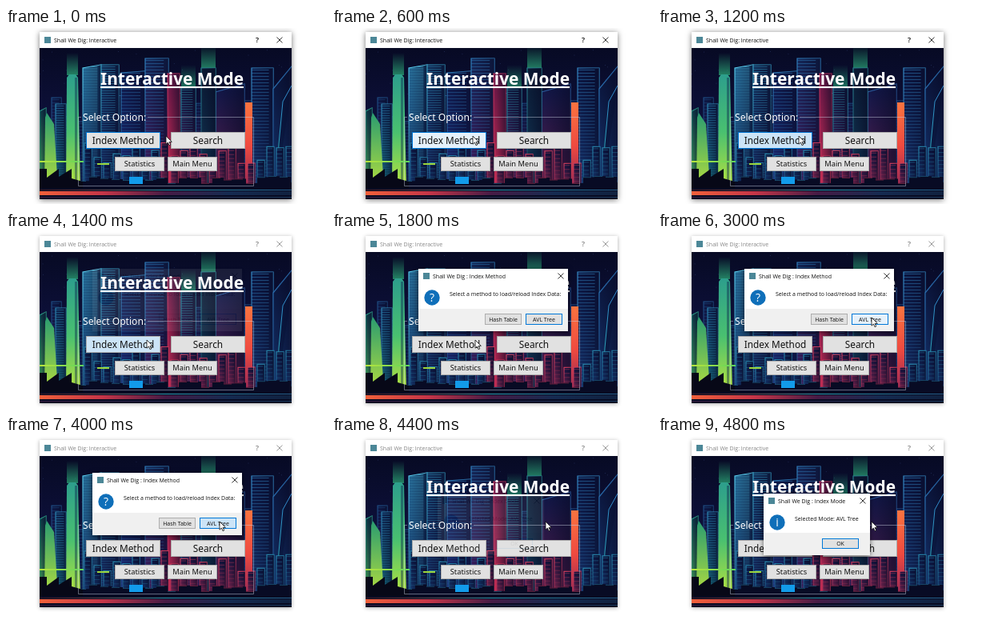
These frames come from a looping animation (400x220 px, 5000 ms). An HTML page with a canvas:

```html
<!DOCTYPE html>
<html lang="en">
<head>
<meta charset="utf-8">
<title>Interactive Mode</title>
<style>
  html, body { margin: 0; width: 400px; height: 220px; overflow: hidden; background: #fff; }
  canvas, svg { position: absolute; left: 0; top: 0; }
  #frame { position: absolute; left: 42px; top: 5px; width: 315px; height: 209px; background: #fff; }
  text { font: 7px "Open Sans", "Noto Sans", sans-serif; fill: #111; }
  .big { font-family: "Noto Sans", "DejaVu Sans", sans-serif; }
  .mid { text-anchor: middle; }
  .dialog { filter: drop-shadow(0 1px 3px #0009); }
</style>
</head>
<body>
<div id="frame"></div>
<canvas id="city" width="400" height="220"></canvas>
<svg id="ui" width="400" height="220" viewBox="0 0 400 220"></svg>
<script>
const LOOP = 5000;
const APP = "Shall We Dig";
const ui = document.getElementById("ui");
const frame = document.getElementById("frame");
const g = document.getElementById("city").getContext("2d");

let seed = 11;
const rnd = () => (seed = seed * 16807 % 2147483647) / 2147483647;
const pick = list => list[Math.floor(rnd() * list.length)];

function box(x, y, w, h, fill) {
  g.fillStyle = fill;
  g.fillRect(x, y, w, h);
}

function blend(grad, colors) {
  colors.forEach((c, i) => grad.addColorStop(i / (colors.length - 1), c));
  return grad;
}
const ramp = (y0, y1, ...colors) => blend(g.createLinearGradient(0, y0, 0, y1), colors);
const sweep = (x0, x1, ...colors) => blend(g.createLinearGradient(x0, 0, x1, 0), colors);

const BASE = 201;

// A tower with roof heights at its left and right, an edge light and floor lines.
function tower(x, w, left, right, c1, c2, edge, floors) {
  const top = Math.min(left, right);
  const light = ramp(top, BASE, edge, edge + "30");
  g.save();
  g.beginPath();
  g.moveTo(x, BASE);
  g.lineTo(x, left);
  g.lineTo(x + w, right);
  g.lineTo(x + w, BASE);
  g.fillStyle = ramp(top, BASE, c1, c2);
  g.fill();
  g.strokeStyle = light;
  g.lineWidth = 1.2;
  g.stroke();
  g.clip();
  // side shade gives the body volume
  box(x, top, w, BASE - top, sweep(x, x + w, "#07092400", "#07092499"));
  if (floors) {
    g.globalAlpha = .55;
    for (let y = top + 2; y < BASE; y += floors) box(x, y, w * .8, .9, light);
  }
  g.restore();
}

function glow(x, w, top, color) {
  box(x, top - 28, w, 28, ramp(top - 28, top, color + "00", color + "b0"));
}

function shape(points, fill) {
  g.beginPath();
  points.forEach(p => g.lineTo(...p));
  g.fillStyle = fill;
  g.fill();
}

function drawCity() {
  g.beginPath();
  g.rect(42, 25, 315, 189);
  g.clip();
  box(42, 25, 315, 189, ramp(25, 200, "#070a24", "#0d103a", "#251650"));
  for (let i = 0; i < 50; i++) box(42 + rnd() * 315, 26 + rnd() * 70, .8, .8, "#506bb070");
  for (let x = 42; x < 357; x += 15) {
    const top = 80 + rnd() * 45;
    tower(x, 12, top, top, "#0d1a48", pick(["#152c66", "#381a58"]), "#1d4a80", 4);
  }

  glow(76, 14, 59, "#2fb87c");
  glow(219, 18, 74, "#239a70");
  glow(244, 18, 50, "#2cab78");
  tower(42, 8, 104, 100, "#0d3a4a", "#48ae5a", "#2b9a86", 0);
  tower(62, 13, 95, 95, "#0e2452", "#14697a", "#2b84b0", 3);
  tower(96, 23, 50, 46, "#164e7c", "#123268", "#55c6e8", 2);
  tower(119, 22, 46, 46, "#112c58", "#14265c", "#3294bb", 3);
  tower(144, 30, 56, 54, "#0e1a4a", "#1c2c78", "#2c74b0", 4);
  tower(174, 29, 38, 38, "#132758", "#441a5c", "#2f7dbb", 4);
  tower(202, 15, 57, 57, "#6b1748", "#d83058", "#c0325c", 0);
  tower(219, 18, 75, 75, "#101c44", "#4d1c5c", "#2d8298", 3);
  tower(262, 36, 80, 70, "#0f184a", "#5d1d4a", "#2c5ca0", 0);
  tower(244, 18, 50, 50, "#0b1a34", "#123a58", "#277b8c", 0);
  tower(307, 27, 50, 50, "#0b1540", "#16346e", "#3488c4", 4);
  tower(334, 24, 76, 47, "#0a1236", "#153672", "#2d78be", 0);

  shape([[48, BASE], [49, 112], [51, 106], [60, 120], [65, BASE]], ramp(106, BASE, "#2a9c70", "#b5df3d"));
  shape([[75, BASE], [76, 62], [79, 58], [87, 58], [90, 62], [93, BASE]], ramp(58, BASE, "#2d9e8c", "#49c070", "#b9e43c"));
  box(86, 62, 3, 139, "#0a264c70");
  box(299, 93, 9, 108, ramp(93, BASE, "#fa7440", "#ef4a40", "#8c2454"));
  shape([[338, BASE], [341, 145], [346, 92], [357, 72]], "#09103470");
  g.strokeStyle = ramp(72, BASE, "#3286cd", "#27b6a8");
  g.beginPath();
  g.moveTo(338, BASE);
  g.lineTo(341, 145);
  g.lineTo(346, 92);
  g.lineTo(357, 72);
  g.stroke();

  // low blocks along the waterfront
  for (let x = 98; x < 357; x += 12) {
    const top = 140 + rnd() * 35;
    const warm = x > 190 && x < 310;
    tower(x, 9, top, top, "#0c1440", warm ? "#8c2650" : "#173d75", warm ? "#ce3c5c" : "#2682a8", 5);
  }
  box(42, 166, 55, 2, sweep(42, 97, "#b8e43c", "#5fd45c"));
  box(114, 169, 15, 2, "#9bd43c");
  for (let x = 90; x < 357; x += 14) {
    const h = 7 + rnd() * 9;
    box(x, BASE - h, 14, h, "#080b24");
    box(x, BASE - h, 10, .8, x > 210 && x < 310 ? "#c4385490" : "#2a86a890");
  }
  shape([[42, 204], [42, 176], [51, 176], [51, 187], [66, 176], [66, 186], [82, 176], [82, 188], [96, 192], [96, 204]], "#070817");
  box(154, 186, 17, 9, "#129bea");
  box(42, 200, 315, 14, "#080b22");
  box(42, 202, 315, 1, sweep(42, 357, "#e8573a30", "#2b93a8", "#235b88"));
  box(42, 204, 315, 5, sweep(42, 357, "#f0603a", "#c53548", "#461b45", "#152a50", "#10213f"));
  box(42, 211, 315, 1, sweep(42, 357, "#3a1c42", "#19395c"));
}

const rect = (x, y, w, h, fill, extra = "") =>
  `<rect x="${x}" y="${y}" width="${w}" height="${h}" fill="${fill}" ${extra}/>`;
const text = (x, y, str, extra = "") => `<text x="${x}" y="${y}" ${extra}>${str}</text>`;
const cross = (x, y) =>
  `<path d="M${x - 3.5} ${y - 3.5}l7 7m0-7l-7 7" stroke="#222" stroke-width=".9"/>`;

function button(x, y, w, h, label, size, id = "", cls = "") {
  return rect(x + .5, y + .5, w - 1, h - 1, "#e1e1e1", `stroke="#adadad" id="${id}"`) +
    text(x + w / 2, y + h / 2 + size * .36, label, `class="mid ${cls}" style="font-size:${size}px"`);
}

function dialog(id, x, y, w, h, bar, foot, title, sign, msgX, msg, buttons) {
  const cy = y + 36;
  return `<g id="${id}" class="dialog">` +
    rect(x, y, w, h, "#fff") + rect(x, foot, w, y + h - foot, "#f0f0f0") +
    rect(x + 6, y + 5, 8, 8, "#4b8797") +
    text(x + 18, y + 11.5, `${APP} : ${title}`) + cross(x + w - 9, y + bar / 2) +
    `<circle cx="${x + 17}" cy="${cy}" r="9.7" fill="#0f6fb9"/>` +
    text(x + 17, cy + 5, sign, 'class="mid" style="font-size:14px;fill:#fff"') +
    text(msgX, cy - 2.5, msg) + buttons + "</g>";
}

function drawUi() {
  const white = "fill:#fff";
  ui.innerHTML =
    rect(42, 5, 315, 20, "#fff") + rect(48, 11, 8, 8, "#4b8797") +
    `<g id="caption">${text(60, 17.7, APP + ": Interactive")}` +
    `${text(314, 18.3, "?", 'class="mid" style="font-size:9px;font-weight:600"')}${cross(342, 15)}</g>` +
    text(207.5, 71, "Interactive Mode",
      `class="big mid" style="font-size:20.9px;font-weight:700;text-decoration:underline;${white}"`) +
    '<path d="M94 111.5H90.5V197.5H309.5V111.5H177" fill="none" stroke="#cdd5e4" stroke-opacity=".45"/>' +
    text(96, 116, "Select Option:", `class="big" style="font-size:12.1px;${white}"`) +
    button(100, 130, 93, 21, "Index Method", 11.8, "index", "big") +
    button(206, 130, 93, 21, "Search", 11.8, "", "big") +
    button(136, 161, 62, 18, "Statistics", 9.3, "", "big") +
    button(202, 161, 62, 18, "Main Menu", 9.3, "", "big") +
    dialog("ask", 108, 46, 187, 78, 18, 96, "Index Method", "?", 147,
      "Select a method to load/reload Index Data:",
      button(191, 102, 46, 14, "Hash Table", 7) + button(242, 102, 46, 14, "AVL Tree", 7, "avl")) +
    dialog("done", 132, 72, 133, 77, 18, 121, "Index Mode", "i", 171, "Selected Mode: AVL Tree",
      button(205, 128, 46, 13, "OK", 7, "ok")) +
    '<path id="cursor" d="M0 0V10.2L2.4 8L4 11.7L5.7 11L4.1 7.4H7.3Z" fill="#fff" stroke="#111" stroke-width=".8"/>';
}

// [from ms, x, y]
const POINTER = [
  [0, 200, 135], [200, 189, 136], [400, 179, 136], [600, 176, 135], [1800, 179, 135],
  [2000, 190, 133], [2200, 199, 129], [2400, 216, 121], [2600, 246, 112],
  [2800, 263, 109], [3000, 267, 107]
];

const el = id => document.getElementById(id);
function paintButton(id, fill, active) {
  el(id).setAttribute("fill", fill);
  el(id).setAttribute("stroke", active ? "#0078d7" : "#adadad");
}

function show(t) {
  const within = (a, b) => t >= a && t < b;
  const active = t < 1400 || within(4200, 4400);
  const [, x, y] = POINTER.findLast(p => p[0] <= t);
  el("cursor").setAttribute("transform", `translate(${x} ${y})`);
  el("caption").style.opacity = active ? 1 : .5;
  frame.style.boxShadow = active ? "0 1px 7px #0008" : "0 1px 5px #0005";
  el("ask").style.opacity = within(1400, 1600) ? .07 : within(1600, 4200) ? 1 : 0;
  el("done").style.opacity = within(4400, 4600) ? .07 : t >= 4600 ? 1 : 0;
  paintButton("index", within(800, 1600) ? "#cce4f7" : within(400, 800) ? "#e5f1fb" : "#e1e1e1", active);
  paintButton("avl", t >= 4000 ? "#cce4f7" : t >= 2800 ? "#e5f1fb" : "#e1e1e1", true);
  paintButton("ok", "#e1e1e1", true);
}

function tick() {
  show(performance.now() % LOOP);
  requestAnimationFrame(tick);
}

drawCity();
drawUi();
tick();
</script>
</body>
</html>
```
